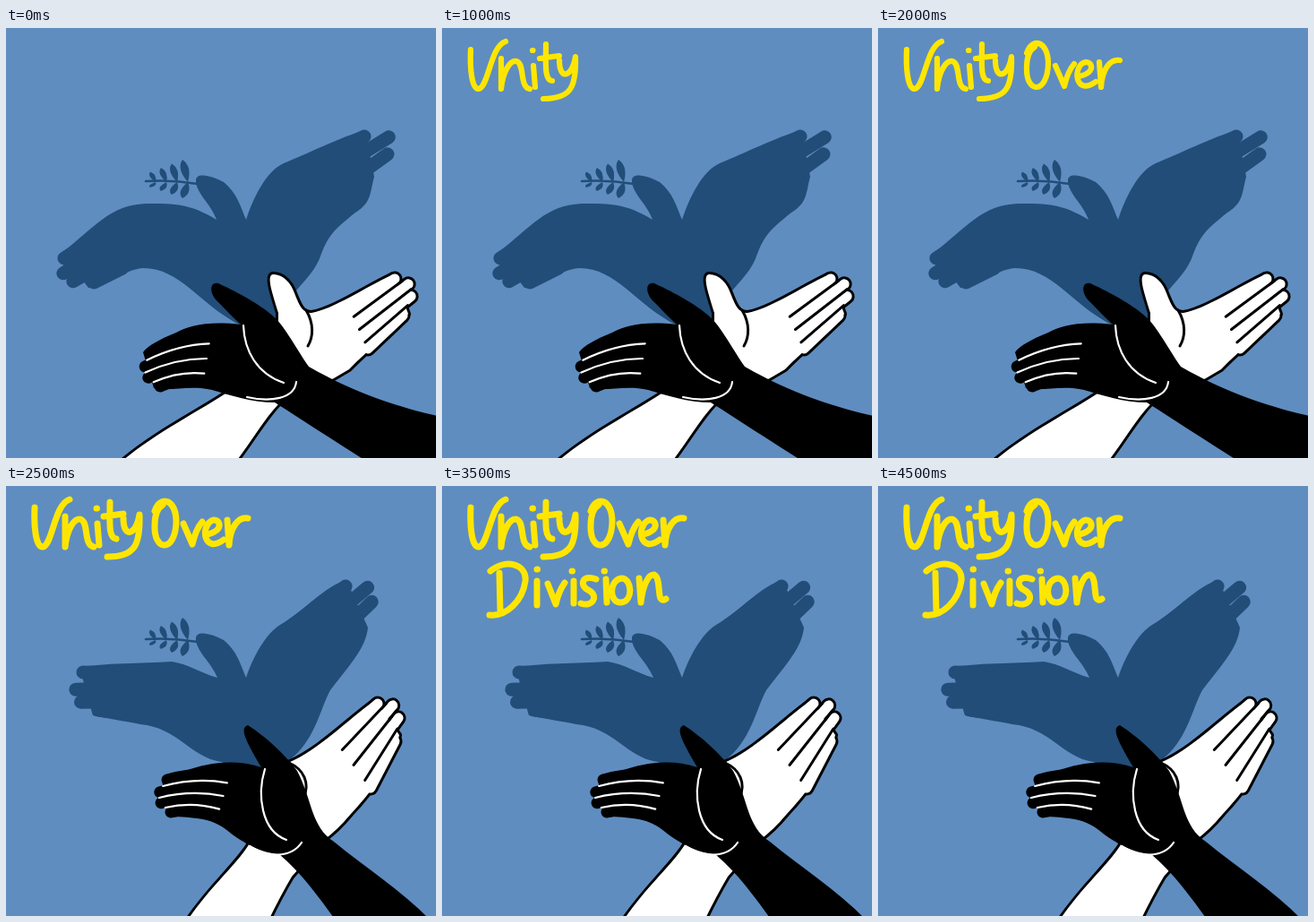
An HTML page that plays this animation: 480 by 480 pixels, repeating every 5 s.

```html
<!DOCTYPE html>
<html lang="en">
<head>
<meta charset="utf-8">
<title>Unity Over Division</title>
<style>
  html, body { margin: 0; width: 100%; height: 100%; overflow: hidden; background: #5f8dc0; }
  svg { display: block; width: 100vw; height: 100vh; }
  path { fill: none; stroke-linecap: round; stroke-linejoin: round; }
  .word { stroke: #ffe600; stroke-width: 6.2; }
  .up .word { stroke-width: 7; }
  .down { animation: leave 1s step-end infinite; }
  .up { animation: enter-50 1s step-end infinite; }
  .word0 { animation: enter-20 5s step-end infinite; }
  .word1 { animation: enter-40 5s step-end infinite; }
  .word2 { animation: enter-60 5s step-end infinite; }
  @keyframes leave { 0% { opacity: 1 } 50%, 100% { opacity: 0 } }
  @keyframes enter-50 { 0% { opacity: 0 } 50%, 100% { opacity: 1 } }
  @keyframes enter-20 { 0% { opacity: 0 } 20%, 100% { opacity: 1 } }
  @keyframes enter-40 { 0% { opacity: 0 } 40%, 100% { opacity: 1 } }
  @keyframes enter-60 { 0% { opacity: 0 } 60%, 100% { opacity: 1 } }
</style>
</head>
<body>
<svg id="stage" viewBox="0 0 480 480" role="img" aria-label="Unity Over Division"></svg>
<script>
const SHADOW = '#214d78', BLACK = '#000', WHITE = '#fff';

const stroke = (d, color, width) => `<path d="${d}" stroke="${color}" stroke-width="${width}"/>`;
const fill = (d, color) => `<path d="${d}" style="fill:${color}"/>`;
const mix = (a, b, t) => a.map((v, k) => v + (b[k] - v) * t);

// Line along the hand at t: 0 is the first finger, 1 the last; tips bulge out in the middle.
function ray({ roots, tips, bulge, bend = 0 }, t) {
  const root = mix(...roots, t);
  const tip = mix(...tips, t).map((v, k) => v + bulge[k] * Math.sin(Math.PI * t));
  const [x, y] = mix(root, tip, .5);
  return `M${root}Q${x} ${y - bend} ${tip}`;
}

const fingers = fan => [0, 1, 2, 3].map(i => ray(fan, i / 3)).join('');
const gaps = fan => [1, 3, 5].map(i => ray(fan, i / 6)).join('');

const neck = 'C229 196 211 184 212 169C214 160 232 166 243 172C258 184 262 200 268 214';

const poses = [{
  name: 'down',
  bird: `M62 251C100 222 115 198 156 196C190 196 205 196 235 214${neck}C276 190 290 160 310 151
    C335 141 375 121 401 114L411 166C406 185 408 195 390 206C365 226 360 232 352 252C346 270 335 280 325 292
    L300 327L262 332C215 308 195 268 153 268C130 270 115 288 92 290Z`,
  wings: [
    { roots: [[120, 222], [130, 268]], tips: [[65, 257], [98, 284]], bulge: [-14, 9] },
    { roots: [[340, 150], [360, 215]], tips: [[400, 121], [396, 178]], bulge: [33, -21] }
  ],
  pale: {
    body: `M130 483C170 450 215 428 245 408L304 345V318C298 298 290 276 298 275C310 275 318 285 322 296
      C327 308 330 318 341 318C365 314 400 290 432 275L449 319C425 344 405 358 383 381L366 391L304 420
      C288 437 275 460 256 485Z`,
    fan: { roots: [[385, 315], [404, 358]], tips: [[434, 280], [443, 321]], bulge: [14, -9] },
    crease: 'M335 315C344 330 343 345 337 355'
  },
  dark: {
    body: `M237 285C226 283 227 298 238 307Q250 320 262 331C225 327 205 332 190 340C170 348 158 355 153 362
      L165 402C185 406 205 398 230 404C250 410 275 418 300 418C330 437 365 460 403 484H486V434
      C440 424 390 408 338 378C320 352 310 330 295 319C280 306 252 292 237 285Z`,
    fan: { roots: [[228, 344], [220, 394]], tips: [[161, 363], [172, 400]], bulge: [-11, 3], bend: 8 },
    crease: 'M265 332C266 360 280 386 310 396M269 412C295 418 322 414 324 395'
  }
}, {
  name: 'up',
  bird: `M82 202C110 198 150 198 185 196C205 199 215 208 236 214${neck}C276 190 290 165 306 155
    C335 138 355 112 380 105L404 158C402 180 385 198 362 228C350 250 345 285 315 307L290 325L240 308
    C205 302 192 270 150 266C130 262 115 260 97 256Z`,
  wings: [
    { roots: [[140, 210], [145, 255]], tips: [[86, 208], [103, 250]], bulge: [-16, 6] },
    { roots: [[320, 155], [350, 215]], tips: [[379, 112], [393, 160]], bulge: [23, -17] }
  ],
  pale: {
    body: `M203 484C230 445 255 425 270 402L300 340L315 309C350 294 380 262 412 239L439 278
      C432 310 405 345 385 366Q370 384 355 395L319 436Q306 458 293 485Z`,
    fan: { roots: [[369, 286], [407, 337]], tips: [[415, 243], [434, 285]], bulge: [12, -14] },
    crease: 'M316 309C332 316 340 332 332 348'
  },
  dark: {
    body: `M270 267C260 270 268 285 285 314C255 304 225 309 200 318L174 327L180 368C195 371 225 367 245 383
      C262 397 285 410 305 411C330 432 350 460 368 485H474C440 450 400 425 366 397C340 380 342 350 325 318
      C310 298 290 280 270 267Z`,
    fan: { roots: [[249, 324], [236, 368]], tips: [[180, 328], [184, 364]], bulge: [-11, 2], bend: 8 },
    crease: 'M289 316C280 345 285 385 313 395M272 402C290 415 318 416 330 398'
  }
}];

const words = [
  // Unity
  `M32 24C31 45 33 68 41 68C52 66 54 20 71 15M66 34V68C68 48 76 36 83 37C93 40 86 66 98 68
   M102 42L104 66M101 25h.5M116 18C116 40 114 58 123 59M109 34L131 31M131 36C131 60 146 54 149 32C150 66 144 79 113 79`,
  // Over
  `M166 28C172 10 190 14 190 40C189 74 165 74 166 44C166 30 170 24 175 21M198 42L208 65Q212 48 219 40
   M224 54C246 50 238 34 229 39C217 46 221 76 243 60M247 38L249 66C250 48 258 34 270 36`,
  // Division
  `M64 97L65 140M54 95C72 80 95 88 93 106C90 128 72 146 53 144M106 106V133M106 93h.5M118 109L127 132Q130 118 137 108
   M147 106V131M145 95h.5M172 104C155 98 154 112 163 116C176 122 168 136 155 131M183 104L184 130M181 95h.5
   M201 103C186 104 186 131 200 130C214 128 212 104 201 103M220 103L222 130C224 112 230 98 237 99C246 104 238 134 250 126`
];

// Leaf pairs shrink towards the end of the twig.
function twig() {
  let leaves = '';
  for (let i = 0; i < 4; i++) {
    const x = 203 - 12 * i, half = 8 - i;
    for (const rise of [4.5 * i - 25, 18 - 4 * i]) {
      leaves += `M${x} 172q${-half - 5} ${rise * .6} -6 ${rise}q${half + 3} ${-rise * .3} 6 ${-rise}z`;
    }
  }
  return fill(leaves, SHADOW) + stroke('M214 174Q185 169 156 171', SHADOW, 2.6);
}

function bird({ bird, wings }) {
  return fill(bird, SHADOW) + wings.map(fan => stroke(fingers(fan), SHADOW, 15)).join('') + twig();
}

function paleHand({ body, fan, crease }) {
  return stroke(body, BLACK, 6) + stroke(fingers(fan), BLACK, 17) +
    fill(body, WHITE) + stroke(fingers(fan), WHITE, 11) + stroke(gaps(fan) + crease, BLACK, 3);
}

function darkHand({ body, fan, crease }) {
  return fill(body, BLACK) + stroke(fingers(fan), BLACK, 13) + stroke(gaps(fan) + crease, WHITE, 2.2);
}

const lettering = words.map((d, i) => `<path class="word word${i}" d="${d}"/>`).join('');

document.getElementById('stage').innerHTML = poses.map(pose =>
  `<g class="${pose.name}">${bird(pose)}${paleHand(pose.pale)}${darkHand(pose.dark)}${lettering}</g>`).join('');
</script>
</body>
</html>
```
